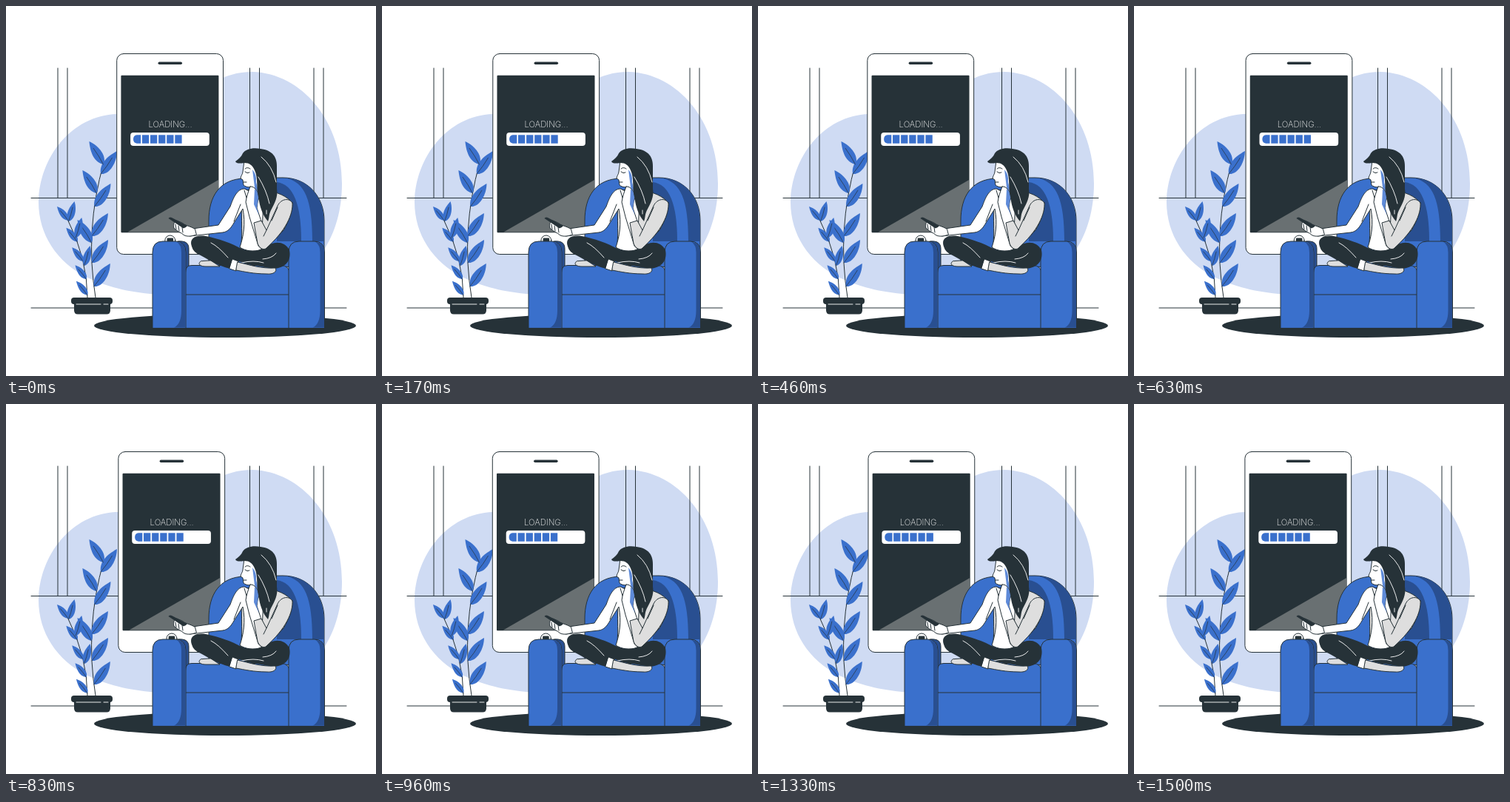
These frames come from a looping animation (500 px wide and 500 px high, 1.54 s). An HTML page:

```html
<!DOCTYPE html>
<html lang="en">
<head>
<meta charset="utf-8">
<title>Loading</title>
<style>
html, body { margin: 0; width: 100%; height: 100%; overflow: hidden; background: #fff; }
svg { display: block; width: 100vw; height: 100vh; }
.ink { fill: #263238; }
.blue { fill: #3a70cc; }
.shade { fill: #294f91; }
.white { fill: #fff; }
.grey { fill: #dedede; }
.line { fill: none; }
.edge { stroke: #263238; stroke-linejoin: round; stroke-linecap: round; }
.lite { fill: none; stroke: #fff; stroke-width: .9; stroke-linecap: round; }
text { font: 200 11.3px Inter, "Open Sans", sans-serif; fill: #fff; }
</style>
</head>
<body>
<svg viewBox="0 0 500 500">
  <path fill="#cfdbf3" d="M44 265C45 205 88 148 150 146C190 145 215 154 244 132C270 110 292 89 333 89C400 91 454 155 454 240C454 275 445 307 428 332C390 382 275 394 195 389C155 385 132 377 110 367C68 346 44 308 44 265Z"/>
  <path id="wall" class="line edge"/>

  <g id="stems"></g>
  <path class="ink" d="M92 402H141V411Q141 416.5 136 416.5H97Q92 416.5 92 411Z"/>
  <rect class="ink" x="88" y="394" width="56" height="9" rx="4"/>
  <path class="lite" d="M95 403H128M132 403H138"/>

  <g id="phone">
    <rect class="white edge" x="149.9" y="64.5" width="143.8" height="271" rx="9"/>
    <rect class="ink" x="205.7" y="75.5" width="32.5" height="3.5" rx="1.75"/>
    <rect class="ink" x="155.6" y="93.7" width="132" height="212.5" rx="1"/>
    <path fill="#697072" d="M164.5 305.5L287.2 235V305.5Z"/>
    <text x="222.2" y="164" text-anchor="middle">LOADING...</text>
    <rect class="white" x="168.3" y="171" width="106.7" height="18" rx="4"/>
    <g id="cells"></g>
    <circle class="white edge" cx="222" cy="317" r="7"/>
    <rect class="ink" x="217.7" y="313.6" width="8.6" height="7" rx="1.2"/>
  </g>

  <ellipse class="ink" cx="296" cy="432" rx="177" ry="16"/>

  <g id="chair">
    <path class="blue edge" d="M274 352V290C274 258 288 234 322 233Q348 232 374 232C408 232 430 258 430 290V352Z"/>
    <path class="shade" d="M378 232.5C404 238 414 262 414 318H429.5V290C429 258 408 233 378 232.5Z"/>
    <path class="shade" d="M366 238Q399 242 399 318H366Z"/>
    <path class="blue edge" d="M239 435V360Q240 351 251 350.5H372Q382 351 383 360V435Z"/>
    <path class="line edge" d="M243 390H382"/>
    <path class="shade edge" d="M232 318C242 317 247 320 247 328V351Q243 353 242.5 360H236Z"/>
  </g>

  <g id="woman">
    <path class="grey edge" d="M263 345C258 349 263 352 270 352H289L277 344Z"/>
    <path class="grey edge" d="M350 249C366 251 381 257 387 267C387 278 382 291 375 303L349 330L317 328C321 306 316 276 320 249Z"/>
    <path class="white edge" d="M322 247C312 247 307 260 303 271L287 296L252 301L248 311L293 306C300 305 304 300 308 293L320 274C324 294 321 311 316 326C323 331 336 333 345 329L348 260Z"/>
    <path class="line edge" d="M322 249L327 266M308 291L317 268"/>

    <path class="ink" d="M251 325C247 314 256 309 270 311C286 314 306 321 318 328C328 332 340 332 350 326C361 317 377 317 383 330C386 345 377 354 362 355L326 349L315 345L309 356C292 354 276 344 263 337Q253 333 251 325Z"/>
    <path class="lite" d="M277 320Q287 325 300 340M318 347Q335 343 348 347M365 334Q360 341 347 342"/>
    <path class="white edge" d="M306 342L314 345L311 358L302 355Z"/>
    <path class="grey edge" d="M313 346C330 350 344 355 364 354C367 359 361 363 352 362C335 362 322 359 311 357Z"/>

    <path class="white edge" d="M255 301C248 297 242 297 238 293L231 290C227 291 226 295 227 300C231 305 237 306 241 310C246 312 252 311 257 309Z"/>
    <path class="ink" d="M219.5 287Q221 284.5 224 286L245 297Q242 301 239 300Z"/>
    <path class="line edge" d="M229 295L230 302M233 297L234 304M238 299L239 306"/>

    <path class="white edge" d="M322 209L320 224C320 227 317 230 317 233L320 235L321 242C325 246 333 244 336 247L343 264L355 250L350 210Z"/>
    <path fill="#5e8ad8" d="M333 221Q339 228 338 238L343 258L337 253Z"/>
    <path class="line edge" d="M323 224Q326 227 329 225M323 220Q326 217 330 220M321 238H325"/>

    <path class="white edge" d="M330 244C336 243 341 251 341 258L339 273L346 294L353 323C351 330 345 330 341 324L329 285L324 265C325 258 327 252 330 244Z"/>
    <path fill="#5e8ad8" d="M336 247Q342 252 341 260L339 273L342 283L335 268Z"/>
    <path class="grey edge" d="M387 266C388 281 379 303 351 328C346 330 342 326 340 321L335 293L345 290L352 303L367 270C372 260 383 259 387 266Z"/>
    <path class="line edge" d="M352 303L348 311M367 272L359 290"/>

    <path class="ink" d="M310 210C314 207 318 204 320 199C324 193 334 191 344 193C360 195 367 204 366 219V247C368 257 363 267 358 276C355 282 356 286 354 291C347 283 343 272 341 258C338 247 341 232 336 222C333 215 329 212 322 212C316 213 311 213 310 210Z"/>
    <path class="lite" d="M345 204Q360 216 365 238M341 231Q352 249 356 267M352 276V281"/>
  </g>
  <g id="arms"></g>
</svg>
<script>
const $ = id => document.getElementById(id);
const repeat = (n, part) => Array.from({ length: n }, (_, i) => part(i)).join("");

$("wall").setAttribute("d", "M34 259.5H460M34 408H460" +
  [70, 329.5, 416].map(x => `M${x} 84V259M${x + 13} 84V259`).join(""));

function leaf(x, y, dx, dy) {
  const at = (along, side) => `${x + dx * along - dy * side} ${y + dy * along + dx * side}`;
  return `<path class="blue" d="M${x} ${y}C${at(.15, .27)} ${at(.65, .24)} ${at(1, 0)}
    C${at(.75, -.12)} ${at(.3, -.3)} ${x} ${y}Z"/>
    <path class="line edge" stroke-width=".7" d="M${x} ${y}Q${at(.35, .03)} ${at(.7, 0)}"/>`;
}

// A stem bends from its root to its top; leaves sit on it at given heights.
function stem(root, bend, tip, bottom, top, sides) {
  const xAt = y => {
    const t = (bottom - y) / (bottom - top);
    return root * (1 - t) ** 2 + 2 * bend * t * (1 - t) + tip * t * t;
  };
  return `<path class="line edge" d="M${root} ${bottom}Q${bend} ${(bottom + top) / 2} ${tip} ${top}"/>` +
    sides.map(({ n, y, dx, dy }) => repeat(n, i => leaf(xAt(y(i)), y(i), dx, dy))).join("");
}

$("stems").innerHTML =
  stem(121, 106, 132, 394, 212, [
    { n: 5, y: i => 379 - 30 * i - 2 * i * i, dx: 22, dy: -31 },
    { n: 3, y: i => 214 + 25 * i + 14 * i * i, dx: -19, dy: -31 }
  ]) +
  stem(110, 110, 83, 394, 288, [
    { n: 5, y: i => 290 + 30 * i - 1.2 * i * i, dx: -15, dy: -19 },
    { n: 3, y: i => 291 + 14 * i + 8 * i * i, dx: 8, dy: -27 }
  ]);

$("cells").innerHTML =
  '<path class="blue" d="M182.4 174.3V185.7H177Q172.2 185 172.2 180T177 174.3Z"/>' +
  repeat(5, i => `<rect class="blue" x="${184.1 + i * 11.1}" y="174.3" width="9.3" height="11.4"/>`);

function armrest(x, w) {
  const r = x + w;
  return `<path class="blue edge" d="M${x} 435V333Q${x} 318 ${x + 14} 318H${r - 14}Q${r} 318 ${r} 333V435Z"/>
    <path class="shade" d="M${r - 16} 434.5Q${r - 6} 430 ${r - 6} 411V333Q${r - 6} 323 ${r - 12} 319
    Q${r - .5} 320 ${r - .5} 333V434.5Z"/>`;
}
$("arms").innerHTML = armrest(198, 45) + armrest(382, 48.5);
$("chair").append($("arms"));

// Phone shake: ten even stretches, the second half mirrors the first.
const LOOP = 1540, STEP = 1000 / 24, SPAN = 1500, LEAD = 28;
const swing = [0, -1, 2, -4, 4, -4];
const key = k => swing[Math.min(k, 10 - k)];

function offset(ms) {
  const tick = Math.floor(ms / STEP + .12);
  const p = Math.min(1, (tick * STEP + LEAD) / SPAN) * 10;
  const k = Math.min(9, Math.floor(p));
  return key(k) + (key(k + 1) - key(k)) * (p - k);
}

function draw(ms) {
  $("phone").setAttribute("transform", `translate(${offset(ms % LOOP).toFixed(3)} 0)`);
}

let start;
function loop(now) {
  start ??= now;
  draw(now - start);
  requestAnimationFrame(loop);
}
draw(0);
requestAnimationFrame(loop);
</script>
</body>
</html>
```
